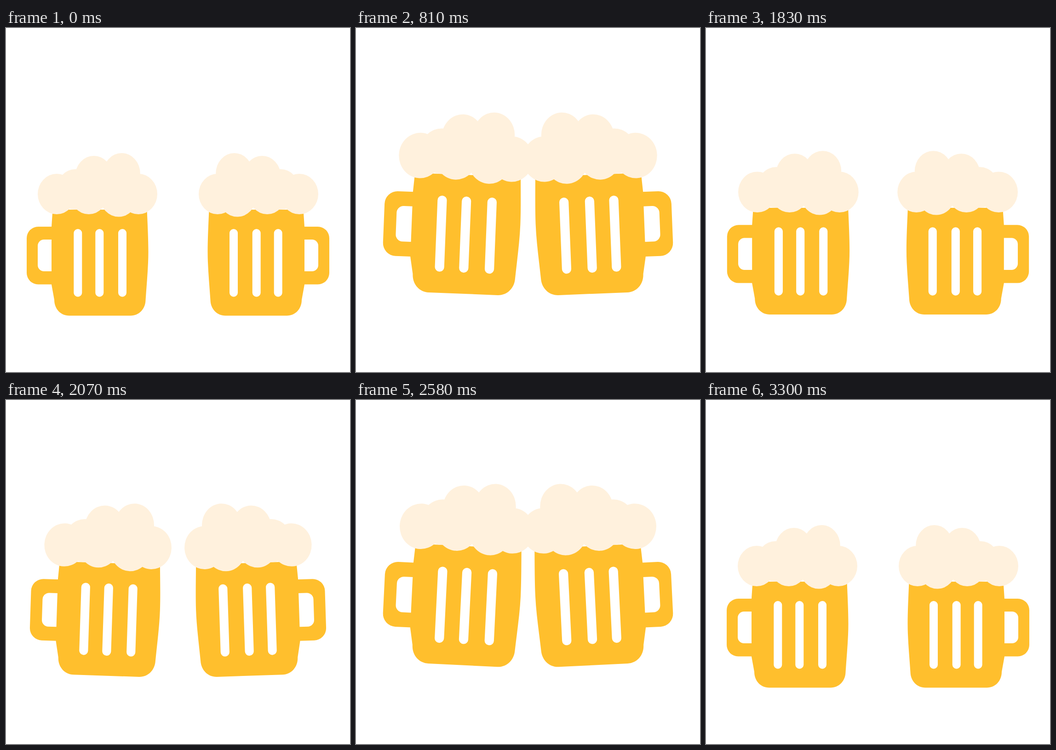
Recreate the animation shown at these times as an HTML page. Size 748x748 px, loop 3.6 s.

```html
<!DOCTYPE html>
<html lang="en">
<head>
<meta charset="utf-8">
<title>Cheers</title>
<style>
  html, body { margin: 0; width: 100%; height: 100%; overflow: hidden; background: #fff; }
  svg { display: block; width: 100vw; height: 100vh; }
  .beer { fill: #ffbf2d; }
  .foam { fill: #fff1dd; }
  .gap { fill: #fff; }
</style>
</head>
<body>
<svg viewBox="0 0 748 748">
  <g id="mug">
    <g id="pose">
      <g class="beer">
        <path d="M101 432H70a25 25 0 0 0-25 25V532.5a25 25 0 0 0 25 25H101z"/>
        <path d="M101.5 395L99 432V558L105 591C105 611 119 625.5 137.5 625.5H271C289 625.5 303 611 303.5 592C306 555 309.5 520 309.5 487C309.5 460 308 430 306.5 395z"/>
      </g>
      <g class="gap">
        <path d="M99 460H82.5a13.5 13.5 0 0 0-13.5 13.5V515.5a13.5 13.5 0 0 0 13.5 13.5H99z"/>
        <rect x="147.3" y="437" width="18" height="147.5" rx="9"/>
        <rect x="194.3" y="437" width="18" height="147.5" rx="9"/>
        <rect x="244" y="437" width="18" height="147.5" rx="9"/>
      </g>
      <g class="foam">
        <ellipse cx="110.3" cy="361" rx="41.3" ry="44"/>
        <ellipse cx="151" cy="351" rx="41" ry="44"/>
        <ellipse cx="180" cy="361" rx="41" ry="44"/>
        <ellipse cx="191" cy="322" rx="40.5" ry="44"/>
        <ellipse cx="251.5" cy="316" rx="40.3" ry="44"/>
        <ellipse cx="245" cy="366.5" rx="41" ry="44"/>
        <ellipse cx="288" cy="361" rx="41" ry="44"/>
      </g>
    </g>
  </g>
  <use href="#mug" transform="translate(748 0) scale(-1 1)"/>
</svg>
<script>
  const CYCLE = 1800, STEP = 30;
  const pose = document.getElementById('pose');

  const clamp = u => Math.min(1, Math.max(0, u));
  const ramp = (t, from, to) => clamp((t - from) / (to - from));
  const smooth = u => (1 - Math.cos(Math.PI * u)) / 2;

  function draw(t) {
    // Rise quickly, sink softly
    const lift = t < 750
      ? Math.sin(Math.PI / 2 * t / 750) ** 1.05
      : 1 - smooth(ramp(t, 750, 1500));
    const grow = 0.124 * lift;

    // Tilt into the clink, then straighten up
    const tilt = 5.1 * (t < 570 ? smooth(ramp(t, 60, 570)) : 1 - smooth(ramp(t, 570, 1020)));

    // Brief sideways squash around the clink
    const squash = Math.sin(Math.PI * ramp(t, 330, 750)) ** 2;

    pose.setAttribute('transform',
      `translate(${78.5 * grow} ${-989.5 * grow}) scale(${1 + grow}) ` +
      `rotate(${tilt} 272 499) ` +
      `translate(187 449) scale(${1 - 0.103 * squash} ${1 - 0.017 * squash}) translate(-187 -449)`);
  }

  const start = performance.now();
  function tick() {
    const t = (performance.now() - start) % CYCLE;
    draw(Math.floor(t / STEP) * STEP);
    requestAnimationFrame(tick);
  }
  tick();
</script>
</body>
</html>
```
